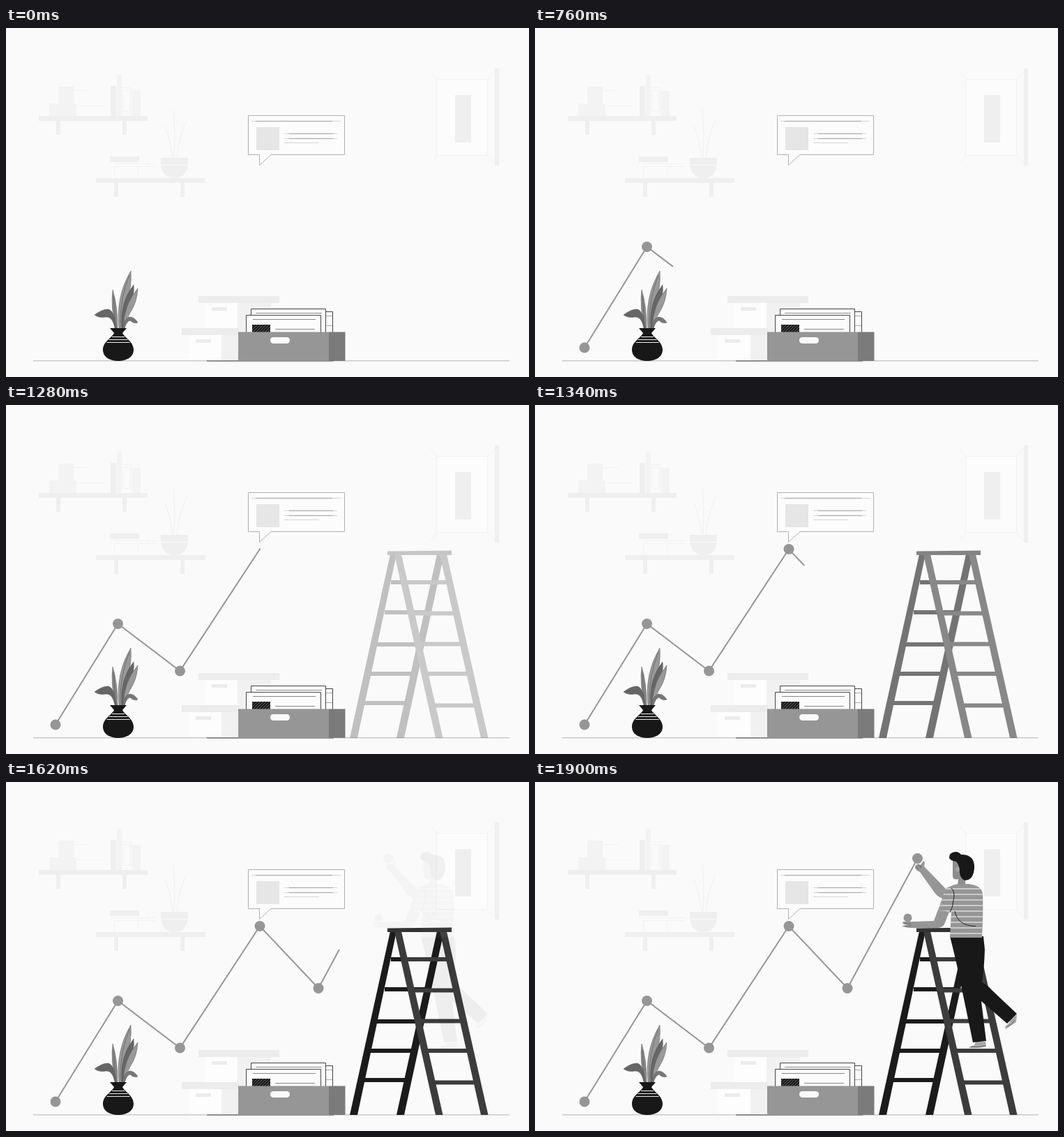
Recreate the animation shown at these times as an HTML page. Size 750 by 500 pixels, loop 2.76 s.

```html
<!DOCTYPE html>
<html lang="en">
<head>
<meta charset="utf-8">
<title>Growth chart</title>
<style>
  html, body { margin: 0; width: 100%; height: 100%; overflow: hidden; background: #fafafa; }
  svg { display: block; width: 100%; height: 100%; }
  .line { fill: none; }
  .ink { fill: #181818; }
  .mid { fill: #969696; }
  .soft { fill: #efefef; }
  .pale { fill: #f3f3f3; }
  .page { fill: #fcfcfc; stroke: #444; }
</style>
</head>
<body>
<svg viewBox="0 0 750 500">
  <defs>
    <pattern id="hatch" width="3" height="3" patternUnits="userSpaceOnUse" patternTransform="rotate(45)">
      <rect width="3" height="3" fill="#151515"/><rect width=".7" height="3" fill="#777"/>
    </pattern>
    <clipPath id="torso">
      <path d="M588 153Q600 147 607 146H622Q640 148 642 160Q643 182 641 223H595L597 186L578 184L584 166Z"/>
    </clipPath>
  </defs>

  <g id="shelves">
    <path class="soft" d="M47 126h156v7H47zM72 133h6v20h-6zM167 133h6v20h-6zM129 215h157v7H129zM155 222h6v20h-6zM250 222h6v20h-6z"/>
    <path class="pale" d="M62 108h39v18H62zM75 84h22v24H75zM159 67h7v59h-7zM181 90h12v36h-12z"/>
    <path class="soft" d="M150 83h8v43h-8zM149 184h42v8h-42z"/>
    <path class="line" stroke="#f2f2f2" d="M97 89.5h23M101 111.5h40M166.500 85.500h13v40M168 89.500h10v30h-10zM155 194.500h59M155.500 198.500h34v16M155.500 198v17M190 198.500h24M204 195v4"/>
    <path class="soft" d="M222 186h39v9q-2 20-19.500 20t-19.500-20z"/>
    <path class="line" stroke="#fafafa" d="M222 196.500h39"/>
    <path class="line" stroke="#f0f0f0" d="M241 186Q243 150 240 117M239 186Q236 160 228 140M245 186Q248 155 259 132"/>
  </g>

  <g id="picture">
    <path class="line" stroke="#f2f2f2" d="M608 61l10 13M608 195l10-12M691 74l11-13M691 183l11 12"/>
    <path fill="#fcfcfc" stroke="#f2f2f2" d="M617.500 73.500h73v109h-73z"/>
    <path class="soft" d="M701 58h6v139h-6zM644 96h23v68h-23z"/>
  </g>

  <g id="bubble">
    <path fill="#fcfcfc" stroke="#b0b0b0" d="M347.500 125.500h138v56H380L363.500 196.500V181.500h-16z"/>
    <path class="line" stroke="#fcfcfc" d="M364 181.500h15"/>
    <path fill="#e6e6e6" d="M359 142h33v33h-33z"/>
    <path class="line" stroke="#d6d6d6" d="M352 133.500h128M399 151.500h76M399 158.500h76M399 164.500h50"/>
    <path class="line" stroke="#a0a0a0" d="M358 133.500h110M406 151.500h63M406 158.500h63"/>
  </g>

  <g id="cabinets">
    <path fill="#fdfdfd" d="M286 394h46v36h-46zM262 440h47v36h-47z"/>
    <path fill="#f1f1f1" d="M332 394h48v42h-48zM309 440h25v36h-25z"/>
    <path fill="#ececec" d="M276 384h116v10H276zM252 430h82v10h-82zM295 400h22v5h-22zM272 446h22v5h-22z"/>
  </g>

  <path class="line" stroke="#cbcbcb" stroke-width="1.500" d="M39 476.800H722"/>

  <g id="crate">
    <path class="line" stroke="#777" stroke-width="1.500" d="M288 477h182"/>
    <path class="page" d="M440.500 406.500h28v30h-28z"/>
    <path class="line" stroke="#aaa" d="M459 412.500h9M459 426.500h9"/>
    <path class="page" d="M351.500 402.500h107v34h-107z"/>
    <path class="line" stroke="#888" d="M358 408.500h95"/>
    <path class="page" d="M344.500 411.500h107v25h-107z"/>
    <path class="line" stroke="#888" d="M354 417.500h90M386 431.500h57"/>
    <path fill="url(#hatch)" d="M353 425h26v11h-26z"/>
    <path class="mid" d="M333 435.500h130v41.500H333z"/>
    <path fill="#7b7b7b" d="M463 435.500h23.500v41.500H463z"/>
    <rect x="379" y="443" width="28" height="9" rx="4.500" fill="#fafafa"/>
  </g>

  <g id="plant">
    <g stroke="#555" stroke-width=".5">
      <path fill="#999" d="M162 430Q157 385 179 348Q181 371 172 398Q167 415 166 430z"/>
      <path fill="#666" d="M166 430Q163 393 183 368Q185 383 176 400Q169 415 168 430z"/>
      <path fill="#999" d="M168 430Q169 396 189 373Q188 393 178 408Q171 420 170 430z"/>
      <path fill="#888" d="M157 430Q150 399 153 375Q160 398 160 430z"/>
      <path fill="#666" d="M156 430Q153 413 143 414Q134 416 127 411Q139 402 147 403Q156 406 158 430z"/>
      <path fill="#777" d="M167 430Q170 416 177 414Q184 414 189 422Q183 424 178 419Q173 420 170 430z"/>
    </g>
    <path class="line" stroke="#666" stroke-width=".8" d="M164 428Q163 388 177 354M157 425L154 383"/>
    <path class="ink" d="M149 430H173L167 437C170 444 183 449 183 461C183 472 172 477 161 477S139 472 139 461C139 449 152 444 155 437z"/>
    <path class="line" stroke="#eee" d="M152 442.500h18M147.500 446.500h27M144.500 450.500h33"/>
  </g>

  <path id="trend" class="line" stroke="#969696" stroke-width="2" pathLength="824" stroke-dasharray="824 900"
    d="M71 458L160.500 313.500L249.500 381L364 206.500L448 295.500L548.500 109.500"/>
  <g id="dots" class="mid"></g>

  <g id="ladder">
    <path fill="#1b1b1b" d="M551 214h9L504 477H493zM618 214h10L571 477H560zM552 251h62v6H552zM543 294h61v6H543zM532 340h63v6H532zM522 382h62v6H522zM512 424h62v6H512z"/>
    <path fill="#3c3c3c" d="M557 214h10L626.500 477H616zM622 214h10L691.500 477H681zM568 251h64v6H568zM582 295.500h60v6H582zM592 339.500h60v6H592zM602 382h60v6H602zM612 427.500h60v6H612z"/>
    <path fill="#333" d="M547 209.500L639 208.500V215H547z"/>
  </g>

  <g id="man">
    <circle class="mid" cx="548.500" cy="109.500" r="7.500"/>
    <circle class="mid" cx="534.500" cy="194.500" r="6"/>
    <path fill="#aaa" d="M632 372H646L647 379Q639 382 622 381Q624 378 630 377zM684 339L691 333L690 344L675 354L674 350Q681 346 681 342z"/>
    <path class="line" stroke="#666" d="M625 379.500q10 1 21-2M677 351q8-4 11-10"/>
    <path class="ink" d="M595 221H643L645 240Q644 270 641 287Q649 291 655 298L691 332L677 346L640 314L647 371L628 373L612 296Q605 260 595 221z"/>
    <path fill="#8e8e8e" d="M599 111L611 112L617 138V149H606L607 139Q601 141 599 136z"/>
    <path class="ink" d="M594 109Q593 101 603 100Q608 100 611 104Q621 103 627 110Q632 118 629 130Q626 141 617 141Q610 139 609 130Q609 119 604 114Q596 113 594 109z"/>
    <ellipse cx="606" cy="125" rx="2.600" ry="3.500" fill="#a5a5a5"/>
    <path class="mid" d="M548 127Q543 123 546 119Q550 116 553 119L557 113Q560 114 558 121L589 153L586 167Q577 165 572 157L552 129z"/>
    <path class="line" stroke="#555" stroke-width=".8" d="M547 121l3 4M550 119l3 4M553 119l1 4"/>
    <path class="mid" d="M578 183L594 186L587 204Q584 209 576 209H540Q530 209 526 206L535 205L527 203L528 200H545L572 199z"/>
    <path class="line" stroke="#555" stroke-width=".7" d="M529 203h10M530 206h10"/>
    <g clip-path="url(#torso)">
      <path class="mid" d="M570 140h80v90h-80z"/>
      <path id="stripes" class="line" stroke="#dcdcdc" stroke-width="1.400"/>
    </g>
    <path class="line" stroke="#222" d="M597 152Q603 157 600 170Q599 180 595 187M602 185Q606 206 632 206.500"/>
  </g>
</svg>
<script>
  const LOOP = 2760;
  const $ = id => document.getElementById(id);

  // Each step is [time in ms, value]; the last value holds to the end of the loop.
  function play(el, prop, steps) {
    const last = steps[steps.length - 1][1];
    const frames = [[0, steps[0][1]], ...steps, [LOOP, last]]
      .map(([time, value]) => ({ offset: time / LOOP, [prop]: value }));
    el.animate(frames, { duration: LOOP, iterations: Infinity });
  }
  const fade = (el, from, to) => play(el, 'opacity', [[from, 0], [to, 1]]);

  $('stripes').setAttribute('d',
    Array.from({ length: 9 }, (_, i) => `M570 ${153 + i * 8}h80`).join(''));

  const drawn = [[352, 0], [760, 216.4], [1160, 429], [1340, 522], [1400, 557], [1700, 718], [1900, 824]];
  play($('trend'), 'strokeDashoffset', drawn.map(([time, length]) => [time, 824 - length]));

  const dots = [[71, 458, 350], [160.5, 313.5, 672], [249.5, 381, 883], [364, 206.5, 1283], [448, 295.5, 1505]];
  for (const [x, y, time] of dots) {
    const dot = document.createElementNS('http://www.w3.org/2000/svg', 'circle');
    dot.setAttribute('cx', x);
    dot.setAttribute('cy', y);
    dot.setAttribute('r', 7.5);
    $('dots').append(dot);
    fade(dot, time, time + 40);
  }

  fade($('ladder'), 1236, 1412);
  fade($('man'), 1612, 1795);
</script>
</body>
</html>
```
